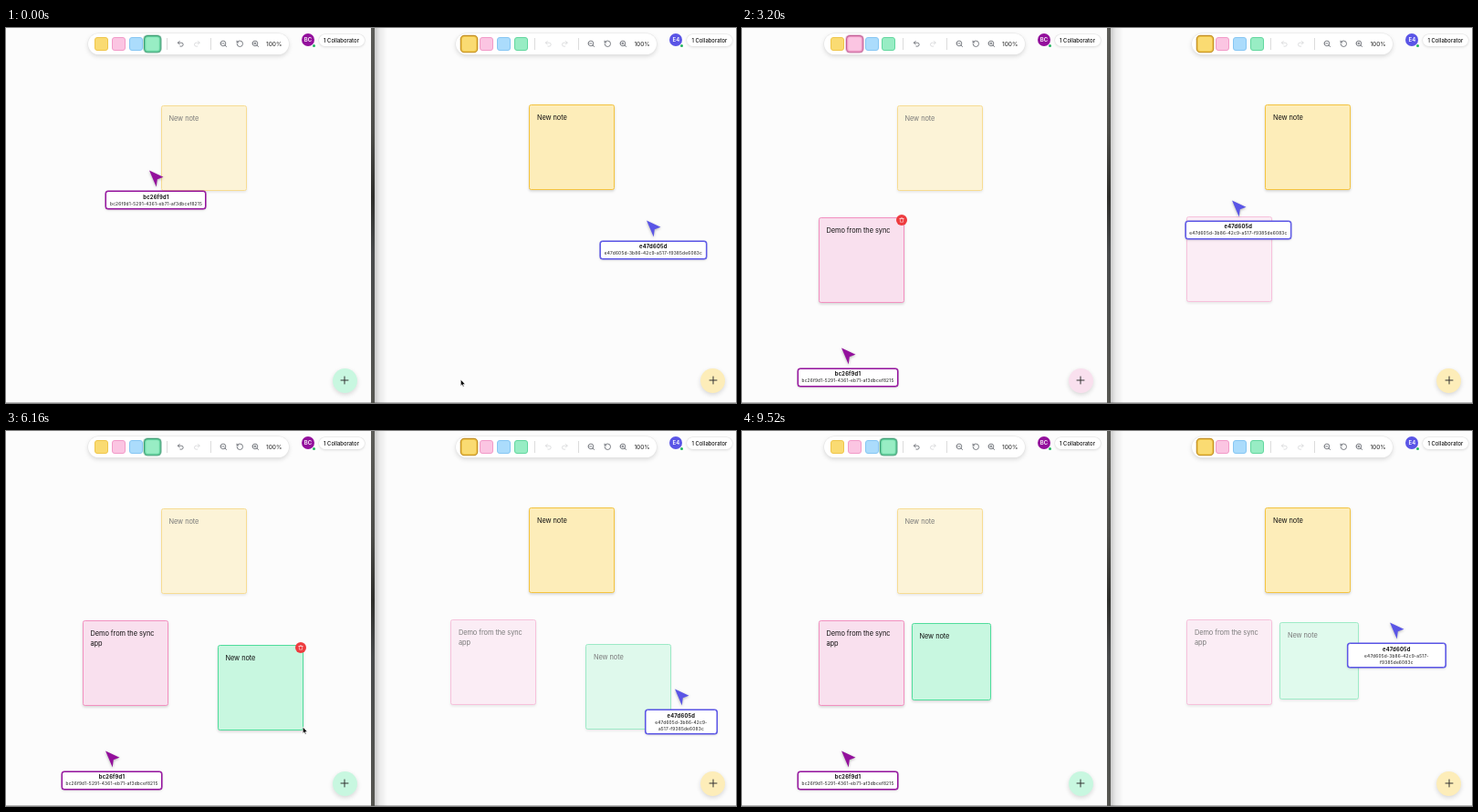
An HTML page that plays this animation: 800x412 px, repeating every 9.6 s.

```html
<!DOCTYPE html>
<html lang="en">
<head>
<meta charset="utf-8">
<title>Shared sticky notes</title>
<style>
@property --n { syntax: "<integer>"; inherits: true; initial-value: 0; }

html, body { margin: 0; width: 100%; height: 100%; overflow: hidden; }
body { position: relative; background: #fcfcfc; font-family: Inter, "Liberation Sans", sans-serif; color: #111; }
div, svg, b, i { position: absolute; box-sizing: border-box; }
svg { fill: none; stroke: #4b4f57; stroke-width: 2; stroke-linecap: round; stroke-linejoin: round; overflow: visible; }

.pane { top: 0; width: 400px; height: 412px; overflow: hidden; background: #fcfcfc; border-bottom: 1px solid #b9b9b9; }
.right { left: 403.4px; width: 396.6px; }
.divider { left: 400px; top: 0; width: 4px; height: 412px;
  background: linear-gradient(#5c5c58, #4c4c48 28%, #2e2e2b 45%, #484a4b 60%, #565651); }
.shade { left: 404px; top: 0; width: 14px; height: 412px;
  background: linear-gradient(90deg, rgba(0,0,0,.2), rgba(0,0,0,.07) 40%, transparent); }

.bar { left: 90px; top: 6px; width: 220px; height: 23px; border-radius: 12px; background: #fff;
  box-shadow: 0 0 0 .5px #e3e3e3, 0 2px 5px rgba(0,0,0,.15); }
.swatch { top: 4px; width: 15px; height: 15px; border-radius: 3px; background: var(--fill); border: 1px solid var(--line); }
.on { scale: 1.15; box-shadow: 0 0 0 1px var(--dark); }
.sep { top: 5px; width: .5px; height: 13px; background: #dcdcdc; }
.bar svg { top: 7.2px; width: 8.6px; height: 8.6px; }
.bar .off { opacity: .25; }
.zoom { left: 195px; top: 6.5px; font: 500 6.4px/10px Inter, sans-serif; color: #444; }
.badge { left: 324px; top: 6px; width: 14px; height: 14px; border-radius: 50%; background: var(--user); color: #fff;
  font: 600 6px/14px Inter, sans-serif; text-align: center; }
.badge i { right: -.5px; bottom: -.5px; width: 3px; height: 3px; border-radius: 50%; background: #22b55e; }
.people { left: 342.5px; top: 7px; width: 50px; height: 13px; border-radius: 7px; background: #fff; text-align: center;
  font: 500 5.8px/13px Inter, sans-serif; letter-spacing: .05px; box-shadow: 0 0 0 .5px #e2e2e2, 0 1px 3px rgba(0,0,0,.13); white-space: nowrap; }

.yellow { --fill: #fadb72; --line: #efc64b; --dark: #c39026; --paper: #fdedb9; --edge: #f4c33f; }
.pink { --fill: #fbc5e2; --line: #f29ac8; --dark: #b8508a; --paper: #f9e0ee; --edge: #f390c0; }
.blue { --fill: #abdcfc; --line: #86c6f3; }
.green { --fill: #98edc4; --line: #62d79f; --dark: #35906a; --paper: #c8f7e0; --edge: #50dd9c; }

.note { width: 94px; height: 94px; padding: 7.5px; border: 1px solid var(--edge); border-radius: 2.5px; background: var(--paper);
  box-shadow: 0 1.5px 3px rgba(0,0,0,.16); font-size: 7.4px; line-height: 11.2px; letter-spacing: -.06px; }
.right .note { margin-top: -.6px; }
.ghost { opacity: .55; }
.note.yellow { left: 170px; top: 85px; }
.note.pink { left: 84px; top: 208px; }
.blank { left: 7.5px; top: 7.5px; white-space: nowrap; }
.mark { left: 21px; top: 7.5px; width: 8px; height: 10px; background: rgba(70,130,240,.4); }
.del { right: -4px; top: -4.5px; width: 12px; height: 12px; border-radius: 50%; background: #ee3c3f; }
.del svg { left: 3px; top: 3px; width: 6px; height: 6px; stroke: #fff; }
.ch { opacity: calc(var(--n) - var(--i));
  box-shadow: .7px 0 0 rgb(17 17 17 / calc((var(--i) + 2 - var(--n)) * var(--caret))); }
.ghost .ch { box-shadow: none; }

.fab { left: 357.8px; top: 373.7px; width: 27px; height: 27px; border-radius: 50%; background: var(--paper); box-shadow: 0 2px 5px rgba(0,0,0,.15); }
.fab svg { left: 7.5px; top: 7.5px; width: 12px; height: 12px; stroke: #333; }

.peer { right: -3.6px; }
.peer svg { left: -8.8px; top: -1.5px; width: 17.5px; height: 20.6px; fill: var(--user); stroke: none; filter: drop-shadow(0 1px 1.5px rgba(0,0,0,.3)); }
.room { left: -.5px; top: 22.5px; width: 125%; }
.tag { left: 0; translate: -50%; padding: 1.5px 3.5px; border: 1px solid var(--user); border-radius: 3px; background: #fff; text-align: center;
  font: 500 4.75px/7px Inter, sans-serif; letter-spacing: .2px; color: #333;
  box-shadow: 0 0 0 .5px var(--user), 0 1px 3px rgba(0,0,0,.18); }
.tag span { display: block; }
.tag .name { margin-bottom: 1px; font-size: 5.8px; font-weight: 700; color: #111; }

.mouse { left: 0; top: 0; }
.arrow { width: 6px; height: 9px; fill: #000; stroke: #fff; stroke-width: .6; }
.hand { left: -4px; top: -4px; width: 8px; height: 8px; fill: #fff; stroke: #222; stroke-width: 1; }

/* motion */
.mouse, .peer, .note.green { animation: 9.6s ease-in-out infinite; }
.left .swatch, .left .fab, .note.pink, .del, .mark, .blank, .arrow, .hand { animation: 9.6s step-end infinite; }
.typed { display: block; animation: type 9.6s linear infinite, caret 9.6s step-end infinite; }

.mouse { animation-name: mouse; }
.arrow { animation-name: arrow; }
.hand { animation-name: hand; }
.left .peer { animation-name: peer-left; }
.right .peer { animation-name: peer-right; }
.left .swatch.green { animation-name: pick-green; }
.left .swatch.pink { animation-name: pick-pink; }
.left .fab { animation-name: fab; }
.left .note.pink { animation-name: add-pink; }
.right .note.pink { animation-name: sync-pink; }
.left .note.green { animation-name: move-green, add-green; }
.right .note.green { animation-name: ghost-green, sync-green; }
.note.green { animation-timing-function: ease-in-out, step-end; }
.pink .blank { animation-name: blank; }
.pink .del { animation-name: del-pink; }
.green .del { animation-name: del-green; }
.mark { animation-name: mark; }

@keyframes mouse {
  0% { transform: translate(498px, 386px); }
  1.5% { transform: translate(402px, 320px); }
  4.5%, 5.5% { transform: translate(124px, 18px); }
  9%, 10% { transform: translate(371px, 388px); }
  12.3%, 41% { transform: translate(129px, 224px); }
  45%, 46% { transform: translate(161px, 18px); }
  48.8%, 49.6% { transform: translate(371px, 388px); }
  51.8%, 53% { transform: translate(241px, 291px); }
  59%, 61% { transform: translate(268px, 245px); }
  63.5%, 65.5% { transform: translate(325px, 325px); }
  70%, 72% { transform: translate(318px, 317px); }
  73.8% { transform: translate(287px, 298px); }
  75.3%, 77% { transform: translate(305px, 310.5px); }
  88%, 94% { transform: translate(259px, 286.5px); }
  99%, 100% { transform: translate(402px, 70px); }
}
@keyframes arrow {
  0%, 41%, 60%, 93% { opacity: 1; }
  13%, 51.5%, 73%, 98.8%, 100% { opacity: 0; }
}
@keyframes hand {
  0%, 60%, 93%, 100% { opacity: 0; }
  51.5%, 73% { opacity: 1; }
}
@keyframes peer-left {
  0% { left: 165px; top: 156.5px; }
  3%, 100% { left: 116.5px; top: 351px; }
}
@keyframes peer-right {
  0%, 2.5% { left: 306.5px; top: 211px; }
  6%, 7.5% { left: 136px; top: -24px; }
  11%, 11.8% { left: 383px; top: 346px; }
  14%, 42.5% { left: 141px; top: 189px; }
  47%, 48% { left: 173px; top: -24px; }
  50.6%, 51.4% { left: 383px; top: 346px; }
  52.08% { left: 364.5px; top: 306.5px; }
  54%, 55% { left: 253px; top: 249px; }
  61%, 62% { left: 280px; top: 204px; }
  64%, 67.5% { left: 337px; top: 283.5px; }
  71%, 73% { left: 330px; top: 275px; }
  75.42%, 75.8% { left: 299px; top: 255.5px; }
  77.5%, 79.5% { left: 317px; top: 268px; }
  90%, 96.5% { left: 271px; top: 244px; }
  99.17%, 100% { left: 314.5px; top: 210.5px; }
}
@keyframes pick-green {
  0%, 45.5%, 100% { scale: 1.15; box-shadow: 0 0 0 1px var(--dark); }
  5% { scale: 1; box-shadow: none; }
}
@keyframes pick-pink {
  0%, 45.5%, 100% { scale: 1; box-shadow: none; }
  5% { scale: 1.15; box-shadow: 0 0 0 1px var(--dark); }
}
@keyframes fab {
  0%, 45.5%, 100% { background: #c8f7e0; }
  5% { background: #f9e0ee; }
}
@keyframes add-pink { 0% { visibility: hidden; } 9.6%, 100% { visibility: visible; } }
@keyframes sync-pink { 0% { visibility: hidden; } 11.5%, 100% { visibility: visible; } }
@keyframes add-green { 0% { visibility: hidden; } 49.4%, 100% { visibility: visible; } }
@keyframes sync-green { 0% { visibility: hidden; } 53.5%, 100% { visibility: visible; } }
@keyframes move-green {
  0%, 53% { left: 205px; top: 281px; width: 94px; height: 94px; }
  59%, 65.5% { left: 232px; top: 235px; width: 94px; height: 94px; }
  70%, 77% { left: 232px; top: 235px; width: 87px; height: 85px; }
  88%, 100% { left: 186px; top: 211px; width: 87px; height: 85px; }
}
@keyframes ghost-green {
  0%, 55% { left: 205px; top: 281px; width: 94px; height: 94px; }
  61%, 77.9% { left: 232px; top: 235px; width: 94px; height: 94px; }
  78%, 79.5% { left: 232px; top: 235px; width: 87px; height: 85px; }
  90%, 100% { left: 186px; top: 211px; width: 87px; height: 85px; }
}
@keyframes blank { 0% { opacity: 1; } 13%, 100% { opacity: 0; } }
@keyframes del-pink { 0% { opacity: 1; } 43%, 100% { opacity: 0; } }
@keyframes del-green { 0% { opacity: 1; } 96%, 100% { opacity: 0; } }
@keyframes mark { 0%, 53.3%, 100% { opacity: 0; } 51.6% { opacity: 1; } }
@keyframes caret { 0%, 31%, 41%, 100% { --caret: 0; } 13%, 35% { --caret: 1; } }
@keyframes type {
  0%, 13% { --n: 0; }
  18.6%, 19.5% { --n: 11; }
  31%, 34.5% { --n: 18; }
  39%, 100% { --n: 22; }
}
</style>
</head>
<body>
<script>
const icon = (d, attrs = "") => `<svg viewBox="0 0 24 24" ${attrs}><path d="${d}"/></svg>`;
const at = x => `style="left:${x}px"`;
const lens = "M3 11a8 8 0 1 0 16 0 8 8 0 1 0-16 0M21 21l-4.3-4.3M8 11h6";
const undo = "M9 14 4 9l5-5M4 9h10.5a5.5 5.5 0 0 1 0 11H11";
const redo = "M15 14l5-5-5-5M20 9H9.5a5.5 5.5 0 0 0 0 11H13";
const reset = "M3 12a9 9 0 1 0 9-9 9.8 9.8 0 0 0-6.7 2.7L3 8M3 3v5h5";
const del = `<div class="del">${icon("M3 6h18M8 6V3h8v3M5 6l1 15h12l1-15")}</div>`;
const typed = [..."Demo from the sync app"].map((c, i) => `<span class="ch" style="--i:${i}">${c}</span>`).join("");

const note = (color, mine, body) =>
  `<div class="note ${color} ${mine ? "" : "ghost"}">${body}${mine && color !== "yellow" ? del : ""}</div>`;

function pane({ side, initials, badge, peer, id, peerColor, fab }) {
  const left = side === "left";
  const swatches = ["yellow", "pink", "blue", "green"].map((c, i) =>
    `<div class="swatch ${c} ${!left && !i ? "on" : ""}" ${at(7 + i * 18.8)}></div>`).join("");
  return `<div class="pane ${side}">
    ${note("yellow", !left, '<div class="blank">New note</div>')}
    ${note("pink", left, `<div class="blank">New note</div><span class="typed">${typed}</span>`)}
    ${note("green", left, `${left ? '<div class="mark"></div>' : ""}<div class="blank">New note</div>`)}
    <div class="bar">${swatches}
      <div class="sep" ${at(86)}></div>
      ${icon(undo, `${at(96.5)} class="${left ? "" : "off"}"`)}
      ${icon(redo, `${at(114.5)} class="off"`)}
      <div class="sep" ${at(134)}></div>
      ${icon(lens, at(144))}${icon(reset, at(161.5))}${icon(lens + "M11 8v6", at(179))}
      <div class="zoom">100%</div>
    </div>
    <div class="badge" style="--user:${badge}">${initials}<i></i></div>
    <div class="people">1 Collaborator</div>
    <div class="fab ${fab}">${icon("M12 4v16M4 12h16")}</div>
    <div class="peer" style="--user:${peerColor}">
      <svg viewBox="0 0 17 20"><path d="M1 1.5 16 8.5 9.5 11 8.5 19Z"/></svg>
      <div class="room"><div class="tag"><span class="name">${peer}</span><span>${id}</span></div></div>
    </div>
  </div>`;
}

const purple = "#93109c", indigo = "#5a55e6";
document.body.innerHTML =
  pane({ side: "left", initials: "BC", badge: purple, peerColor: purple, fab: "green",
    peer: "bc26f9d1", id: "bc26f9d1-5291-4361-eb71-af3dbcef8215" }) +
  pane({ side: "right", initials: "E4", badge: indigo, peerColor: indigo, fab: "yellow",
    peer: "e47d605d", id: "e47d605d-3b86-42c9-a517-f9385de6083c" }) +
  `<div class="shade"></div>
  <div class="divider"></div>
  <div class="mouse">
    <svg class="arrow" viewBox="0 0 6 9"><path d="M.3.3v7l1.6-1.5 1 2.5 1.1-.5-1-2.4h2.2z"/></svg>
    <svg class="hand" viewBox="0 0 8 8"><path d="M1.6 4.4 1 3.4q.2-.8 1-.4V1.8q.7-.8 1.3 0 .7-.8 1.4 0 .7-.6 1.3.2.9-.2 1 .7v2.1L6.2 7.4H3.1z"/></svg>
  </div>`;
</script>
</body>
</html>
```
